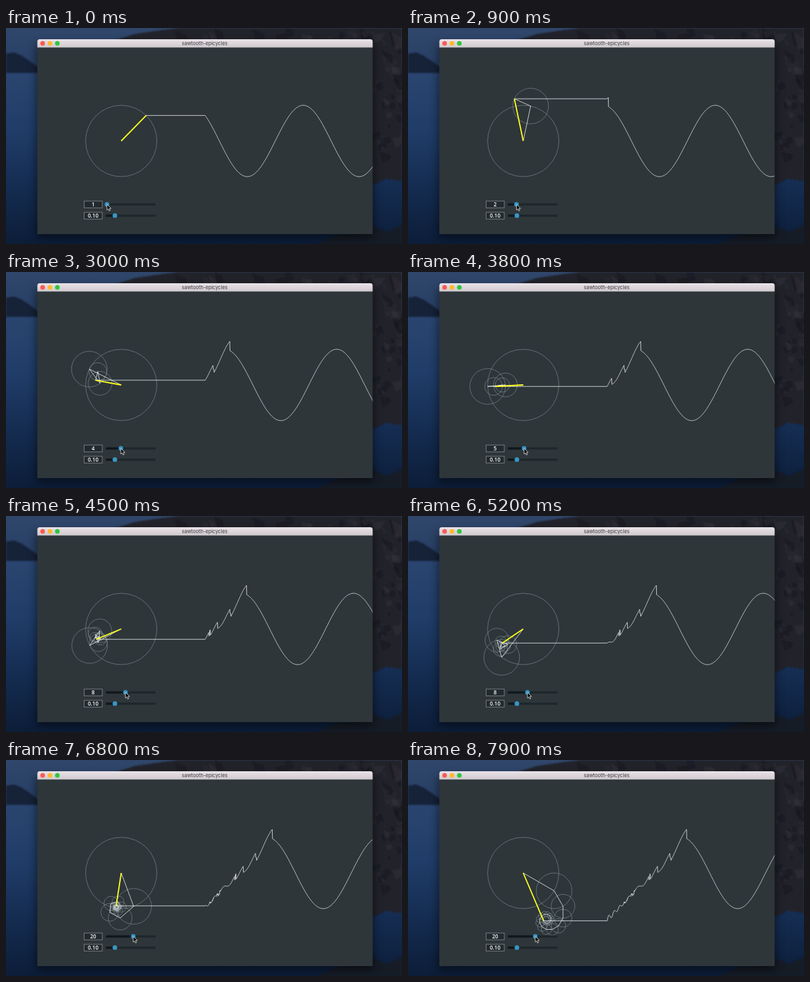
These frames come from a looping animation (600x327 px, 8000 ms). An HTML page:

```html
<!DOCTYPE html>
<html lang="en">
<head>
<meta charset="utf-8">
<title>sawtooth-epicycles</title>
<style>
  html, body { margin: 0; width: 100%; height: 100%; overflow: hidden; background: #14233c; }
  svg { display: block; width: 100vw; height: 100vh; }
  .thin { fill: none; stroke: #eef1f2; stroke-width: .8; stroke-linejoin: round; }
  .ring { fill: none; stroke: #748286; stroke-width: .75; }
  .label { font: 600 8px "Open Sans", "Noto Sans", sans-serif; fill: #fff; text-anchor: middle; }
  .title { font: 400 7.5px Inter, Roboto, sans-serif; fill: #3c393c; text-anchor: middle; }
  .box { fill: #222a2e; stroke: #899195; stroke-width: .8; }
  .track { fill: #1d262a; }
  .fill { fill: #11181c; }
  .knob { fill: #3797c5; }
</style>
</head>
<body>
<svg viewBox="0 0 600 327" preserveAspectRatio="none">
  <defs>
    <linearGradient id="sky" x2="0" y2="1">
      <stop offset="0" stop-color="#30476b"/><stop offset="1" stop-color="#263e64"/>
    </linearGradient>
    <linearGradient id="sea" x2="0" y2="1">
      <stop offset="0" stop-color="#2a4670"/><stop offset=".35" stop-color="#203c68"/>
      <stop offset=".7" stop-color="#142b4f"/><stop offset="1" stop-color="#0c1d38"/>
    </linearGradient>
    <linearGradient id="bar" x2="0" y2="1">
      <stop offset="0" stop-color="#e9e3e8"/><stop offset="1" stop-color="#cfc9ce"/>
    </linearGradient>
    <filter id="soft" x="-10%" y="-10%" width="120%" height="125%"><feGaussianBlur stdDeviation="7"/></filter>
    <filter id="haze"><feGaussianBlur stdDeviation=".8"/></filter>
    <clipPath id="pane"><rect x="47.5" y="29.5" width="508" height="282.5"/></clipPath>
  </defs>

  <rect width="600" height="70" fill="url(#sky)"/>
  <rect y="62" width="600" height="265" fill="url(#sea)"/>
  <g filter="url(#haze)">
    <path d="M0 39L12 37 24 42 36 50 50 60 62 68H0Z" fill="#192338"/>
    <path d="M160 20L196 9 230 4 262 0H600V232L575 228 556 238 520 200 400 40 200 40Z" fill="#202129"/>
    <path d="M470 327L500 314 540 308 556 300 578 309 600 298V327Z" fill="#171c28"/>
    <g id="rocks"></g>
  </g>
  <rect x="46" y="24" width="511" height="294" rx="4" opacity=".5" filter="url(#soft)"/>

  <path d="M47.5 312V20.5q0-3.5 3.5-3.5H552q3.5 0 3.5 3.5V312Z" fill="#2e363a"/>
  <path d="M47.5 29.5V20.5q0-3.5 3.5-3.5H552q3.5 0 3.5 3.5V29.5Z" fill="url(#bar)"/>
  <circle cx="55.5" cy="23.2" r="3.5" fill="#fb5a52"/>
  <circle cx="66.6" cy="23.2" r="3.5" fill="#fdb92c"/>
  <circle cx="77.8" cy="23.2" r="3.5" fill="#2fc53e"/>
  <text class="title" x="301" y="26">sawtooth-epicycles</text>

  <g clip-path="url(#pane)">
    <g id="rings"></g>
    <path id="arms" class="thin"/>
    <path id="wave" class="thin"/>
    <path id="sum" fill="none" stroke="#ffff1e" stroke-width="1.8"/>
  </g>

  <rect class="box" x="118.3" y="262" width="27.6" height="10.2"/>
  <text id="count" class="label" x="132" y="270"></text>
  <rect class="track" x="151.5" y="265.5" width="75" height="3.2"/>
  <rect id="fill" class="fill" x="151.5" y="265.5" height="3.2"/>
  <circle id="knob" class="knob" cy="267.1" r="3.5"/>
  <rect class="box" x="118.3" y="279" width="27.6" height="10.2"/>
  <text class="label" x="132" y="287">0.10</text>
  <rect class="track" x="151.5" y="282.5" width="75" height="3.2"/>
  <rect class="fill" x="151.5" y="282.5" width="13.5" height="3.2"/>
  <circle class="knob" cx="165" cy="284.1" r="3.5"/>
  <path id="cursor" d="M0 0V8.6L2 6.8 3.4 10 4.9 9.3 3.5 6.2H6.2Z" fill="#000" stroke="#fff" stroke-width=".7"/>
</svg>
<script>
const LOOP = 8000, FRAME = 100;
const CX = 174.6, CY = 171, R = 54;
const WAVE_X = 301.8, WAVE_END = 557, WAVE_SPEED = 16.94;
const SAMPLE = 1 / 60;
const MAX_RINGS = 20;

// Slider drag: [seconds, knob x]
const DRAG = [
  [0, 153], [.4, 153], [.8, 163.5], [1.2, 167], [2.17, 167], [2.33, 174],
  [3.3, 174], [3.5, 175.8], [4, 176], [4.2, 181], [5.4, 181], [5.8, 188],
  [6, 188], [6.4, 192.8]
];

const $ = id => document.getElementById(id);

function make(parent, tag, attrs) {
  const node = document.createElementNS("http://www.w3.org/2000/svg", tag);
  for (const key in attrs) node.setAttribute(key, attrs[key]);
  return parent.appendChild(node);
}

function knobX(t) {
  const i = DRAG.findIndex(key => key[0] > t);
  if (i < 0) return DRAG[DRAG.length - 1][1];
  if (i === 0) return DRAG[0][1];
  const [t0, x0] = DRAG[i - 1], [t1, x1] = DRAG[i];
  return x0 + (x1 - x0) * (t - t0) / (t1 - t0);
}

// The slider has a cubic response
const termCount = t => Math.round(1 + 110 * ((knobX(t) - 151) / 75) ** 3);
const angle = t => (45.6 + 36 * t) * Math.PI / 180;

function joints(t) {
  const a = angle(t), points = [[CX, CY]];
  let x = CX, y = CY;
  for (let k = 1, n = termCount(t); k <= n; k++) {
    x += R / k * Math.cos(k * a);
    y -= R / k * Math.sin(k * a);
    points.push([x, y]);
  }
  return points;
}

const toPath = points => "M" + points.map(p => p[0].toFixed(2) + " " + p[1].toFixed(2)).join("L");

const rings = Array.from({ length: MAX_RINGS }, (_, i) =>
  make($("rings"), "circle", { class: "ring", r: R / (i + 1) }));

function draw(t) {
  const points = joints(t), tip = points[points.length - 1], x = knobX(t);

  rings.forEach((ring, i) => {
    const shown = i < points.length - 1;
    ring.style.display = shown ? "" : "none";
    if (!shown) return;
    ring.setAttribute("cx", points[i][0]);
    ring.setAttribute("cy", points[i][1]);
  });

  const trail = [tip];
  for (let age = 0; age * WAVE_SPEED < WAVE_END - WAVE_X; age += SAMPLE)
    trail.push([WAVE_X + age * WAVE_SPEED, joints(t - age).pop()[1]]);

  $("arms").setAttribute("d", toPath(points));
  $("wave").setAttribute("d", toPath(trail));
  $("sum").setAttribute("d", toPath([points[0], tip]));
  $("count").textContent = points.length - 1;
  $("knob").setAttribute("cx", x);
  $("fill").setAttribute("width", x - 151.5);
  $("cursor").setAttribute("transform", `translate(${x} 267)`);
}

function scatterRocks() {
  let seed = 11;
  const random = () => (seed = seed * 16807 % 2147483647) / 2147483647;
  const shades = ["#2d2c33", "#17181e", "#34323a", "#1b1d26"];
  const rock = (x, y, size, shade) => make($("rocks"), "path", {
    d: `M${x} ${y}l${size} ${size * (random() - .3)} ${size * .2} ${size * .7} ${-size * .8} ${size * .4}Z`,
    fill: shade, opacity: .6
  });
  for (let i = 0; i < 44; i++)
    rock(553 + random() * 44, random() * 205, 4 + random() * 11, shades[i % 4]);
  for (let i = 0; i < 20; i++)
    rock(250 + random() * 340, random() * 12, 5 + random() * 12, shades[i % 4]);
}

let shown = -1;
function tick() {
  const frame = Math.floor(performance.now() % LOOP / FRAME);
  if (frame !== shown) draw((shown = frame) * FRAME / 1000);
  requestAnimationFrame(tick);
}

scatterRocks();
tick();
</script>
</body>
</html>
```
